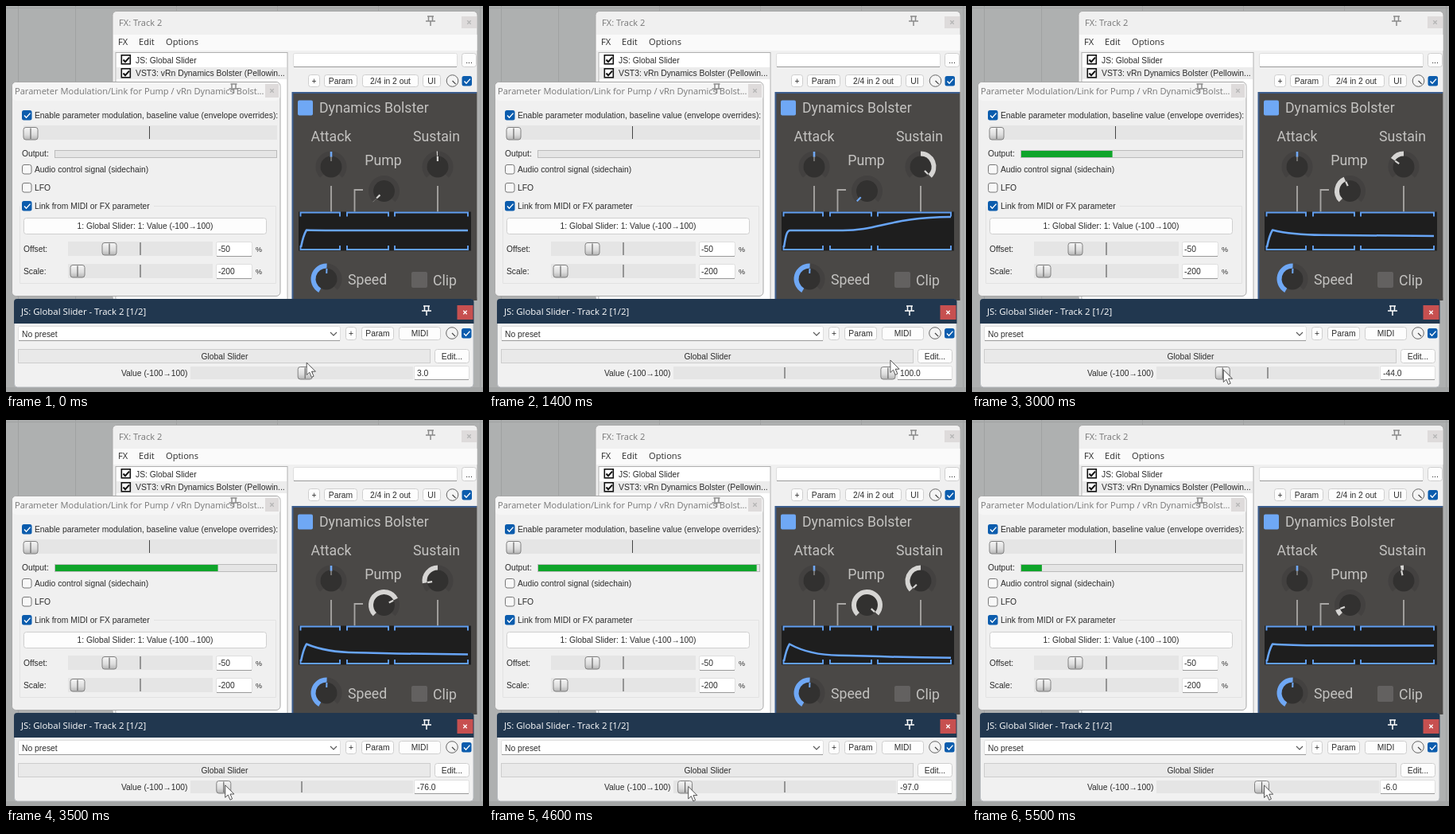
An HTML page for the animation above (5.6 s loop, 600 px wide and 485 px high).

```html
<!DOCTYPE html>
<html lang="en">
<head>
<meta charset="utf-8">
<title>Slider modulation</title>
<style>
html, body { margin: 0; width: 100%; height: 100%; overflow: hidden; background: #aeb0b0; }
svg { display: block; width: 100vw; height: 100vh; }
text { font: 10.3px "Liberation Sans", Arial, sans-serif; fill: #2c2c2c; white-space: pre; }
.ui { font-family: "Open Sans", "Noto Sans", sans-serif; font-size: 11.1px; }
.plug { font-family: Roboto, sans-serif; font-size: 17.7px; fill: #c3c2c0; }
.mid { text-anchor: middle; }
</style>
</head>
<body>
<svg id="stage" viewBox="0 0 600 485" xmlns="http://www.w3.org/2000/svg"></svg>
<script>
const LOOP = 5600, STEP = 100;
const BLUE = '#6fa8f5', PALE = '#d6d5d3', EDGE = '#a8a8a8';

// Markup helpers
const rect = (x, y, w, h, fill, stroke = 'none', r = 0, extra = '') =>
  `<rect x="${x}" y="${y}" width="${w}" height="${h}" rx="${r}" fill="${fill}" stroke="${stroke}" ${extra}/>`;
const path = (d, stroke, w = 1, fill = 'none', extra = '') =>
  `<path d="${d}" stroke="${stroke}" stroke-width="${w}" fill="${fill}" ${extra}/>`;
const text = (x, y, s, cls = '', style = '') =>
  `<text x="${x}" y="${y}" class="${cls}" style="${style}">${s}</text>`;
const disc = (x, y, r, fill, stroke = 'none') =>
  `<circle cx="${x}" cy="${y}" r="${r}" fill="${fill}" stroke="${stroke}"/>`;

const button = (x, y, w, h, s) =>
  rect(x + .5, y + .5, w - 1, h - 1, '#fdfdfd', '#cfcfcf', 3) +
  text(x + w / 2, y + h / 2 + 3.7, s, 'mid');
const field = (x, y, w, h) =>
  rect(x + .5, y + .5, w - 1, h - 1, '#fff', '#dedede', 2) +
  path(`M${x + 1} ${y + h - .5}h${w - 2}`, '#9a9a9a');
const tick = (x, y, color, w) => path(`M${x + 3} ${y + 6.5}l2.5 2.7 5-5.6`, color, w);
const checkbox = (x, y, on) => on
  ? rect(x, y, 12.5, 12.5, '#0b5cad', 'none', 2.5) + tick(x, y, '#fff', 1.4)
  : rect(x + .5, y + .5, 11.5, 11.5, '#f8f8f8', '#777', 2.5);
const listCheck = (x, y) =>
  rect(x + .8, y + .8, 11, 11, '#fff', '#111', 0, 'stroke-width="1.6"') + tick(x, y, '#111', 2);
const pin = (x, y, color) =>
  path(`M${x - 4} ${y - 6}h8M${x - 2.5} ${y - 6}v6M${x + 2.5} ${y - 6}v6M${x - 6} ${y}h12M${x} ${y}v6`, color, 1.5);
const cross = (x, y, color) =>
  path(`M${x - 2.2} ${y - 2.2}l4.4 4.4m0 -4.4l-4.4 4.4`, color, 1.3);
const miniKnob = (x, y) => disc(x, y, 7.3, '#f4f4f4', '#666') + path(`M${x} ${y}l4.2 4.2`, '#444', 1.2);
const track = (x, y, w, h, mid) =>
  rect(x, y, w, h, '#e5e5e5') + path(`M${mid} ${y + 1}v${h - 2}`, '#444');
const thumb = (x, y, id = '') =>
  `<g ${id && `id="${id}"`} transform="translate(${x} ${y})">` +
  rect(-9, -7.5, 18, 15.5, 'url(#metal)', '#808080', 3) +
  path('M0 -6.5v13.5', '#666', 1.2) + '</g>';

const polar = (cx, cy, r, deg) => {
  const a = deg * Math.PI / 180;
  return `${(cx + r * Math.sin(a)).toFixed(2)} ${(cy - r * Math.cos(a)).toFixed(2)}`;
};
const arc = (cx, cy, r, from, to) => {
  const [a, b] = from < to ? [from, to] : [to, from];
  return `M${polar(cx, cy, r, a)}A${r} ${r} 0 ${b - a > 180 ? 1 : 0} 1 ${polar(cx, cy, r, b)}`;
};
const pointer = (cx, cy, deg, r0 = 7, r1 = 13) => `M${polar(cx, cy, r0, deg)}L${polar(cx, cy, r1, deg)}`;
const knob = (x, y, id) =>
  path(arc(x, y, 16.5, -135, 135), '#434140', 6) + disc(x, y, 13.5, '#323130') +
  (id ? `<path id="${id}Arc" fill="none" stroke="${PALE}" stroke-width="6"/>` +
        `<path id="${id}Tip" fill="none" stroke="${PALE}" stroke-width="2.2"/>` : '');

function backdrop() {
  return '<defs><linearGradient id="metal" x2="0" y2="1"><stop stop-color="#f6f6f6"/>' +
    '<stop offset=".6" stop-color="#dcdcdc"/><stop offset="1" stop-color="#b4b4b4"/></linearGradient></defs>' +
    rect(0, 0, 600, 485, '#aeb0b0') +
    path('M0 2.5H600M15.5 0V485M87.5 0V485M214.5 0V6M341.5 0V6M468.5 0V6M596.5 0V485', '#a0a2a2') +
    rect(0, 479, 600, 6, '#a4a6a6');
}

function fxWindow() {
  return rect(134, 6.5, 459, 364, '#f0f0f0', EDGE, 5) +
    rect(135, 36, 457.5, 20, '#fafafa') +
    text(142, 24.5, 'FX: Track 2', 'ui', 'fill:#777') +
    pin(534, 19, '#8a8a8a') + rect(573, 13, 19, 15, '#dedbdb') + cross(582.5, 20.5, '#b5b5b5') +
    text(141, 49, 'FX', 'ui') + text(167, 49, 'Edit', 'ui') + text(201, 49, 'Options', 'ui') +
    rect(138, 58.5, 216, 312, '#fff', '#b0b0b0') + rect(139, 77, 214, 15, '#ececec') +
    listCheck(144.5, 61) + listCheck(144.5, 78) +
    text(163, 72, 'JS: Global Slider') +
    text(163, 88, 'VST3: vRn Dynamics Bolster (Pellowin...', '', 'font-size:10.4px') +
    field(361, 59, 207, 18) + button(573, 59, 19, 18, '...') +
    button(380, 86, 15, 16, '+') + button(400, 86, 42, 16, 'Param') +
    button(448, 86, 71, 16, '2/4 in 2 out') + button(524, 86, 23, 16, 'UI') +
    miniKnob(561.5, 94) + checkbox(573.5, 88, true);
}

function plugin() {
  const bracket = (a, b) =>
    path(`M${a} 264.5v-5H${b}v5M${a} 301v5H${b}v-5`, '#62a0f2', 1.9);
  return rect(360, 108, 232.5, 262, '#4a4846') + path('M360.5 370V109H592', '#3b5c8c', 2) +
    rect(367, 118.5, 19, 19, BLUE, 'none', 2) +
    text(394, 134, 'Dynamics Bolster', 'plug') +
    text(409, 170, 'Attack', 'plug mid') + text(541.5, 170, 'Sustain', 'plug mid') +
    text(474.5, 199.5, 'Pump', 'plug mid') + text(430, 350, 'Speed', 'plug') + text(537, 351, 'Clip', 'plug') +
    path('M409 226V259M543 226V259M449 231H438.5V259', '#a9a7a5', 1.8) +
    knob(409, 202) + path(pointer(409, 202, 0, 12, 19), BLUE, 2.6) + path(pointer(409, 202, 0), '#8a8886', 1.5) +
    knob(543, 202, 'sustain') + knob(475.5, 232.5, 'pump') +
    knob(403, 343) + path(arc(403, 343, 16.5, -150, 2), BLUE, 6) + path(pointer(403, 343, 2), BLUE, 2) +
    rect(510, 334, 20, 20, '#636160', 'none', 2) +
    rect(368, 258.5, 217, 49, '#1e1e1e') +
    bracket(370.5, 420) + bracket(429, 481) + bracket(489, 581) +
    `<path id="curve" fill="none" stroke="#68a5f6" stroke-width="2.5" stroke-linejoin="round"/>`;
}

function modWindow() {
  const row = (y, label, x, value) =>
    text(22, y + 4, label) + track(78, y - 9, 182, 18, 169) + thumb(x, y) +
    field(264, y - 9, 46, 19) + text(267, y + 4, value) + text(314, y + 4, '%', '', 'font-size:9px');
  return rect(7.5, 95.5, 337.5, 269, '#f0f0f0', EDGE, 5) +
    rect(8, 96, 336.5, 23, '#f5f5f5', 'none', 5) +
    text(11, 111, 'Parameter Modulation/Link for Pump / vRn Dynamics Bolst...', 'ui', 'fill:#777') +
    pin(286.5, 104, '#8a8a8a') + rect(326, 98, 17, 17, '#dedbdb') + cross(334.5, 106.5, '#b5b5b5') +
    checkbox(20, 131, true) +
    text(36, 141, 'Enable parameter modulation, baseline value (envelope overrides):') +
    track(22, 150, 319, 18, 180.5) + thumb(31, 160) +
    text(20, 189, 'Output:') + rect(61.5, 181.5, 279, 9, '#e5e5e5', '#bcbcbc') +
    `<rect id="meter" x="62" y="182" height="8" fill="#0fa52a"/>` +
    checkbox(20, 199) + text(36, 209, 'Audio control signal (sidechain)') +
    checkbox(20, 222) + text(36, 232, 'LFO') +
    path('M186 251.5H339.5V348.5H17.5V251.5', '#e2e2e2') +
    checkbox(20, 245, true) + text(36, 255, 'Link from MIDI or FX parameter') +
    button(22, 266, 306, 21, '1: Global Slider: 1: Value (-100→100)') +
    row(305, 'Offset:', 130, '-50') + row(333, 'Scale:', 90, '-200');
}

function sliderWindow() {
  return rect(10.5, 368.5, 577.5, 110.5, '#f1f1f1', '#b4b8bd', 4) +
    path('M10 399V372q0 -4 4 -4H584.5q4 0 4 4V399z', 'none', 0, '#21374f') +
    text(19, 387.7, 'JS: Global Slider - Track 2 [1/2]', 'ui', 'fill:#fff;font-size:11.4px') +
    pin(529, 383, '#fff') + rect(567.5, 376, 20, 18, '#c75050') + cross(577.5, 385, '#fff') +
    field(15, 402, 406, 19) + text(20, 415.5, 'No preset') + path('M408 410l4 4 4-4', '#555', 1.1) +
    button(427, 403, 14, 17, '+') + button(447, 403, 41, 17, 'Param') + button(494, 403, 53, 17, 'MIDI') +
    miniKnob(561, 411) + checkbox(573, 405, true) +
    rect(15.5, 431.5, 518, 17, '#e9e9e9', '#cdcdcd') + text(275, 443.5, 'Global Slider', 'mid') +
    button(539, 431, 44, 18, 'Edit...') +
    text(145, 464.5, 'Value (-100→100)') +
    track(232, 453, 280, 16, 372) + field(513, 452, 70, 18) +
    `<text id="value" x="517" y="464.5"></text>` + thumb(0, 461, 'thumb');
}

const stage = document.getElementById('stage');
stage.innerHTML = backdrop() + fxWindow() + plugin() + modWindow() + sliderWindow() +
  path('M0 0V15.5L3.6 12.2L6.2 18.4L8.9 17.2L6.3 11.2H11.2Z', '#444', .9, '#fff', 'id="cursor"');
const $ = id => document.getElementById(id);

// Slider value: time, value, slope per step
const VALUE = [
  [0, 3, 9], [1200, 100, 0], [1500, 100, 0], [2200, 40, -11], [3000, -44, -7],
  [4100, -99, -2], [4200, -100, 0], [4500, -100, 0], [5000, -51, 13], [5500, -6, 9], [5600, 3, 9]
];
// Pointer: time, offset from the thumb, height
const HAND = [
  [0, 2, 448], [1400, 3, 445], [2200, 1, 461], [3000, 1, 457],
  [4100, 3, 461], [5000, 5, 460], [5500, 3, 459], [5600, 3, 459]
];

function span(keys, t) {
  let i = 0;
  while (i < keys.length - 2 && t >= keys[i + 1][0]) i++;
  const a = keys[i], b = keys[i + 1];
  return [a, b, (t - a[0]) / (b[0] - a[0])];
}

function valueAt(t) {
  const [a, b, u] = span(VALUE, (t + LOOP) % LOOP);
  const n = (b[0] - a[0]) / STEP, w = 1 - u;
  const v = w * w * (1 + 2 * u) * a[1] + u * u * (3 - 2 * u) * b[1] +
    n * u * w * (w * a[2] - u * b[2]);
  return Math.max(-100, Math.min(100, v));
}

function envelope(v) {
  const base = 282, d = -.17 * v, y = k => (base + d * k).toFixed(2);
  return v >= 0
    ? `M371 303C373 291 374 282 379 282H445C490 282 505 ${y(.97)} 581 ${y(1)}`
    : `M371 303Q374 288 378 281.5C394 ${y(.5)} 412 ${y(.8)} 440 ${y(.82)}S500 ${y(.96)} 581 ${y(1)}`;
}

function draw(time) {
  const t = Math.floor(time % LOOP / STEP) * STEP;
  const v = Math.round(valueAt(t));
  const late = valueAt(t - 38); // the plug-in trails the slider slightly
  const pump = Math.max(0, -late / 100);
  const x = 372.3 + 1.296 * v;

  $('thumb').setAttribute('transform', `translate(${x.toFixed(2)} 461)`);
  $('value').textContent = v.toFixed(1);
  const [a, b, u] = span(HAND, t);
  const mix = i => a[i] + (b[i] - a[i]) * u;
  $('cursor').setAttribute('transform', `translate(${(x + mix(1)).toFixed(2)} ${mix(2).toFixed(2)})`);

  $('meter').setAttribute('width', pump < .01 ? 0 : (278 * pump).toFixed(2));
  const turn = late * 1.35, side = Math.abs(turn) < 4 ? 4 * (turn < 0 ? -1 : 1) : turn;
  $('sustainArc').setAttribute('d', arc(543, 202, 16.5, 0, side));
  $('sustainTip').setAttribute('d', pointer(543, 202, turn));
  const lift = -135 + 270 * pump;
  $('pumpArc').setAttribute('d', pump > 0 ? arc(475.5, 232.5, 16.5, -135, lift) : '');
  $('pumpTip').setAttribute('d', pump > 0 ? pointer(475.5, 232.5, lift) : pointer(475.5, 232.5, lift, 11, 18));
  $('pumpTip').setAttribute('stroke', pump > 0 ? PALE : BLUE);
  $('curve').setAttribute('d', envelope(late));
}

const start = performance.now();
function loop() {
  draw(performance.now() - start);
  requestAnimationFrame(loop);
}
loop();
</script>
</body>
</html>
```
